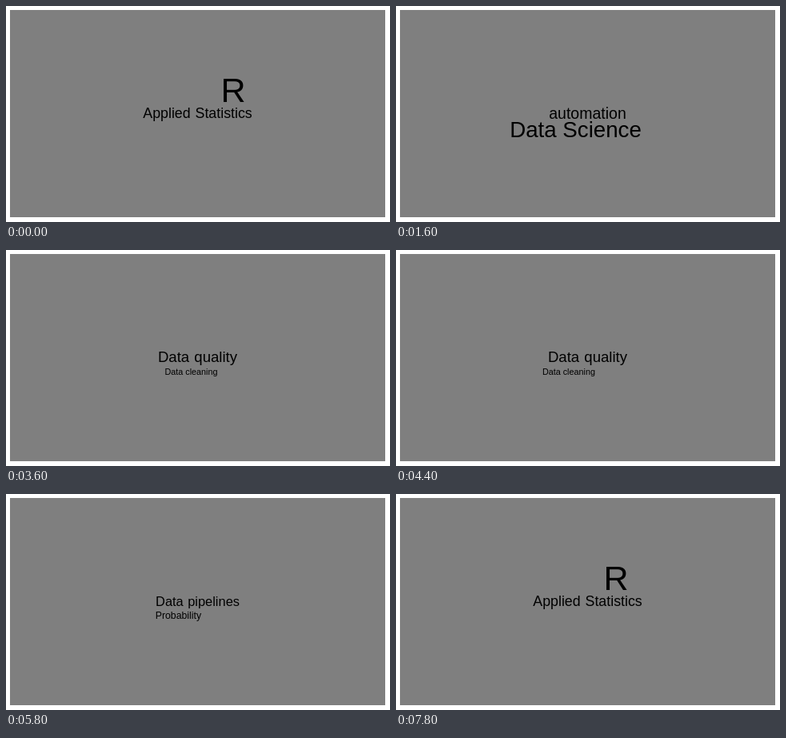
An HTML page that plays this animation: 480 px wide and 270 px high, repeating every 8000 ms.

```html
<!DOCTYPE html>
<html lang="en">
<head>
<meta charset="utf-8">
<title>Word pairs</title>
<style>
  html, body { margin: 0; width: 100%; height: 100%; overflow: hidden; background: #fff; }
  svg { display: block; width: 480px; height: 270px; }
  text {
    font-family: "Liberation Sans", Arial, sans-serif;
    font-kerning: none;
    text-anchor: middle;
  }
  #fixed { word-spacing: 1px; }
</style>
</head>
<body>
<svg viewBox="0 0 480 270">
  <rect x="5" y="5" width="469" height="259" fill="#7f7f7f"/>
  <text id="fixed"></text>
  <text id="roaming"></text>
</svg>
<script>
const STEP = 200, STEPS = 40;
const SWAY = 18, TURN = Math.PI * 5 / 6;

// A centred word and a word swaying around its home, which it passes at step `home`.
const scene = (start, home, word, size, other, otherSize, x, y) =>
  ({ start, home, word, size, other, otherSize, x, y });

const scenes = [
  scene(-2, 0, "Applied Statistics", 17.8, "R", 43, 284, 105),
  scene(5, 8, "automation", 19.5, "Data Science", 27.7, 224.5, 154),
  scene(13, 13, "visualization", 21, "modeling", 13, 225, 148),
  scene(18, 18, "Data quality", 18.6, "Data cleaning", 10.8, 231.5, 152),
  scene(23, 25, "Data pipelines", 16.4, "Probability", 12.3, 231, 152),
  scene(31, 33, "KoboToolbox", 18, "parameters", 16.4, 216, 116)
];

const fixed = document.getElementById("fixed");
const roaming = document.getElementById("roaming");

function place(node, word, size, x, y) {
  node.textContent = word;
  node.setAttribute("font-size", size);
  node.setAttribute("x", x);
  node.setAttribute("y", y + Math.round(size * 0.345));
}

function draw() {
  // The first scene begins shortly before the loop wraps.
  const lead = -scenes[0].start;
  const step = (Math.floor(performance.now() / STEP) + lead) % STEPS - lead;
  const now = scenes.findLast(s => s.start <= step);
  const sway = SWAY * Math.sin(TURN * (step - now.home));
  place(fixed, now.word, now.size, 239.5, 134);
  place(roaming, now.other, now.otherSize, now.x + sway, now.y);
  requestAnimationFrame(draw);
}
draw();
</script>
</body>
</html>
```
